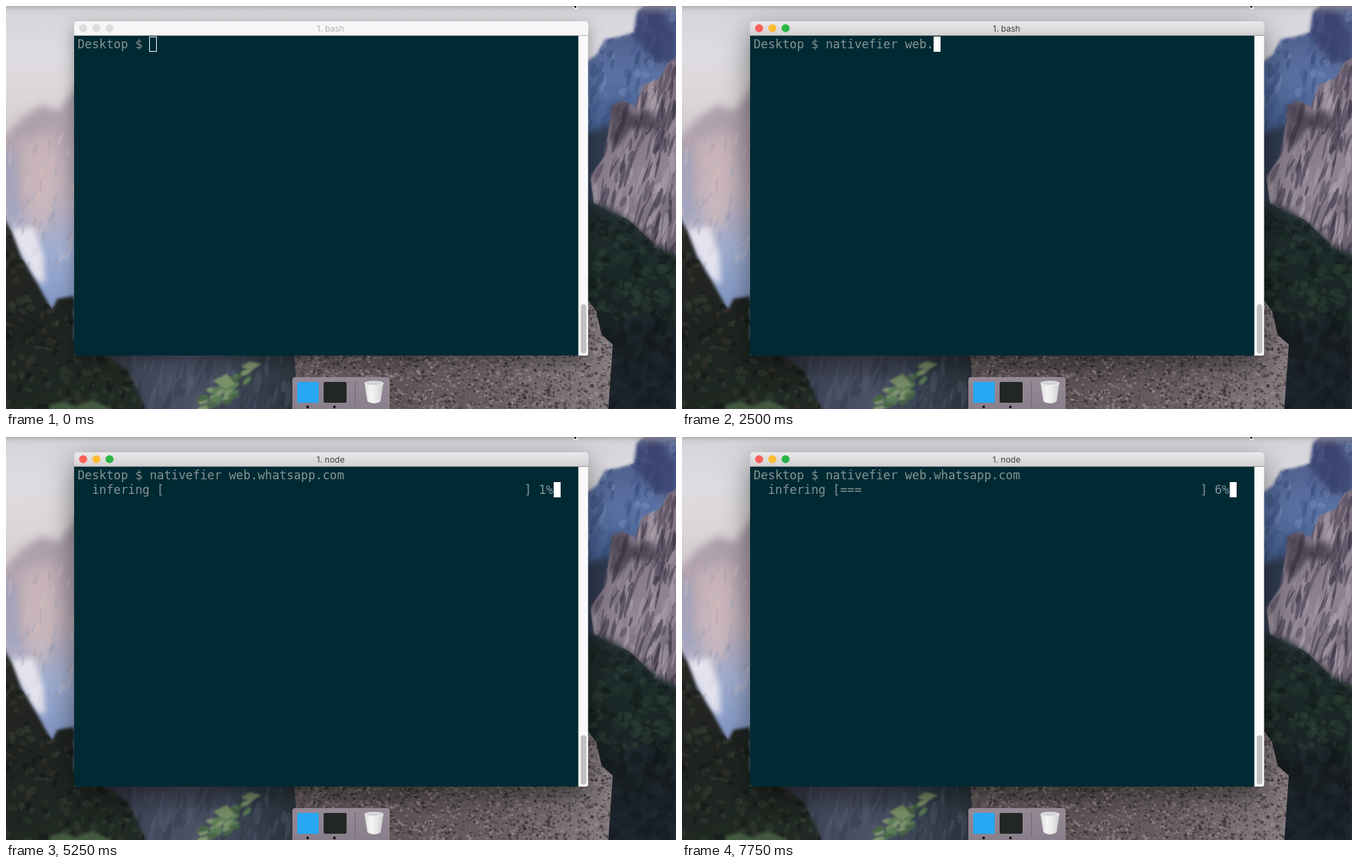
An HTML page with a canvas for the animation above (8 s loop, 964 px wide and 581 px high).

```html
<!DOCTYPE html>
<html lang="en">
<head>
<meta charset="utf-8">
<title>Terminal session</title>
<style>
  html, body { margin: 0; width: 100%; height: 100%; overflow: hidden; }
  canvas { display: block; }
</style>
</head>
<body>
<canvas id="stage" width="964" height="581"></canvas>
<script>
const W = 964, H = 581, LOOP = 8000, STEP = 250;
const COL = 10.375, LINE = 21, LEFT = 103, BASE = 61;
const COMMAND = 'nativefier web.whatsapp.com';
const stage = document.getElementById('stage').getContext('2d');

let seed = 7;
const random = () => (seed = (seed * 16807) % 2147483647) / 2147483647;

function gradient(c, x0, y0, x1, y1, ...colors) {
  const g = c.createLinearGradient(x0, y0, x1, y1);
  colors.forEach((color, i) => g.addColorStop(i / (colors.length - 1), color));
  return g;
}

function box(c, x, y, w, h, radius, fill) {
  c.beginPath();
  c.roundRect(x, y, w, h, radius);
  c.fillStyle = fill;
  c.fill();
}

function oval(c, x, y, rx, ry, fill, turn = 0) {
  c.beginPath();
  c.ellipse(x, y, rx, ry, turn, 0, 2 * Math.PI);
  c.fillStyle = fill;
  c.fill();
}

function shape(c, path, fill, blur = 0) {
  c.filter = blur ? `blur(${blur}px)` : 'none';
  c.fillStyle = fill;
  c.fill(new Path2D(path));
  c.filter = 'none';
}

// Scatters flecks of mean radii w and h over an area, clipped to a path.
function flecks(c, path, [x, y, width, height], count, w, h, alpha, colors) {
  c.save();
  c.clip(new Path2D(path));
  c.globalAlpha = alpha;
  for (let i = 0; i < count; i++) {
    oval(c, x + random() * width, y + random() * height,
      w * (0.4 + random()), h * (0.4 + random()), colors[i % colors.length], random() * 0.5);
  }
  c.restore();
}

function drawLandscape(c) {
  c.fillStyle = gradient(c, 0, 0, 0, 200, '#d5d4d9', '#dedce2', '#dcd6d7', '#cfc5cb');
  c.fillRect(0, 0, W, H);

  // Hazy mountains on the left
  const haze = 'M-9 195L25 160L52 143L76 152L110 105V600H-9Z';
  shape(c, haze, gradient(c, 0, 110, 0, 440, '#a59ca6', '#b3a4b0', '#bcaeba', '#9dadd2', '#7f94c2'), 6);
  shape(c, 'M-9 215L12 205L18 300L-9 310Z', 'rgba(150,158,192,.6)', 6);
  shape(c, 'M22 195L70 180L80 250L60 320L35 330Z', 'rgba(216,192,190,.55)', 8);
  shape(c, 'M5 322L40 318L54 360L56 402L40 392L18 352Z', 'rgba(235,232,240,.9)', 4);
  flecks(c, haze, [0, 170, 98, 210], 60, 2, 9, 0.3, ['#a0919f', '#d6c8c8', '#939fbc']);

  // Distant valley along the bottom
  shape(c, 'M90 495H430V600H90Z', gradient(c, 110, 0, 415, 0, '#262f32', '#3f4557', '#4b5165', '#3b4454', '#2b353d'));
  flecks(c, 'M170 504H415V581H170Z', [170, 504, 245, 77], 70, 4, 15, 0.3, ['#2a323c', '#5d6379']);

  // Dark slope
  const slope = 'M-5 302L8 325L22 362L45 400L66 438L74 422L98 418V490L140 503L175 525L205 590H-5Z';
  shape(c, slope, gradient(c, 0, 310, 90, 581, '#292824', '#1f2320', '#202923'), 2);
  flecks(c, slope, [0, 310, 205, 271], 300, 5, 5, 0.45, ['#111615', '#344035', '#3c372f']);

  // Leaves in front of the valley
  c.save();
  c.filter = 'blur(1.5px)';
  for (let i = 0; i < 34; i++) {
    const along = random(), x = 280 + along * 70, y = 576 - along * 38;
    oval(c, x + random() * 14 - 7, y + random() * 26 - 13, 8, 3.5,
      ['#5b7d56', '#80986f', '#476447'][i % 3], -random());
  }
  c.restore();
  shape(c, 'M338 520L350 512L368 516L352 526ZM298 540L318 530L330 546L312 551Z', '#7b9169', 1.5);
  shape(c, 'M62 576L82 570L100 577L124 568L151 580V590H65Z', '#435a40', 2);

  // Blue peaks on the right
  const peaks = 'M830 84L850 70L862 48L884 44L904 38L908 8L925 -5H970V320H830Z';
  shape(c, peaks, gradient(c, 0, 0, 0, 300, '#4b5480', '#5a72a4', '#3f5a8a', '#2f3d55'), 2);
  flecks(c, peaks, [835, 0, 129, 190], 110, 5, 9, 0.4, ['#304a76', '#7c90b8', '#40598c']);
  shape(c, 'M905 45L912 5L938 -3L950 25L964 40V85L936 85Z', 'rgba(50,56,95,.6)', 4);
  shape(c, 'M830 185L870 170V320H830Z', '#303b50', 5);

  // Cliff and trees
  const cliff = 'M866 188L872 143L888 137L905 145L916 114L941 104L952 82L970 72V375L925 346L888 310L846 284L841 246L860 218Z';
  shape(c, cliff, gradient(c, 850, 150, 960, 350, '#7c7081', '#8f8393', '#6a6070'), 1);
  flecks(c, cliff, [840, 85, 124, 280], 230, 3, 18, 0.5, ['#352f40', '#b4a7b1', '#4c4455', '#a094a0']);
  shape(c, 'M866 188L872 143L888 137L900 158L930 150L945 180L900 176L878 205Z', 'rgba(46,40,54,.6)', 4);
  const trees = 'M830 282L865 290L900 312L935 345L970 362V590H830Z';
  shape(c, trees, gradient(c, 0, 290, 0, 581, '#222d31', '#1a2826', '#181f22', '#1b222c'), 4);
  flecks(c, trees, [830, 300, 134, 150], 170, 7, 6, 0.45, ['#111b1a', '#2f4336', '#22342f']);
  flecks(c, trees, [860, 440, 104, 141], 80, 8, 9, 0.35, ['#10161b', '#232d34']);

  // Granite block
  const rock = 'M415 504L838 425L849 440L857 474L873 488L866 590H421Z';
  shape(c, rock, gradient(c, 420, 0, 873, 0, '#665b5d', '#5f5558', '#6b6165', '#857c81'));
  flecks(c, rock, [415, 425, 460, 156], 4200, 2.2, 1.7, 0.6, ['#2b2729', '#a09290', '#4a4144', '#887b7b', '#655a5c']);

  // Top edge and pointer tail
  c.fillStyle = gradient(c, 0, 0, 0, 14, 'rgba(150,147,145,.6)', 'rgba(200,197,196,.2)', 'rgba(200,197,196,0)');
  c.fillRect(0, 0, W, 14);
  shape(c, 'M814 -2H820L823 3L819 5Z', '#fff');
  shape(c, 'M815 -2H819L821 2L819 3Z', '#111');
}

function drawDock(c) {
  box(c, 412, 535, 140, 52, 4, gradient(c, 0, 535, 0, 581, '#958994', '#897f8c'));
  box(c, 419, 542, 31, 30, 1, '#27a7f3');
  box(c, 457, 542, 33, 30, 2, '#222725');
  oval(c, 434, 578, 2, 2, '#111');
  oval(c, 472.5, 578, 2, 2, '#111');
  c.fillStyle = '#706875';
  c.fillRect(502, 541, 1, 36);
  shape(c, 'M516 544L520 570Q530 576 539 570L543 544Z',
    gradient(c, 516, 0, 543, 0, '#dcdcdd', '#f4f4f4', '#e6e6e7', '#c9c9cc'));
  oval(c, 529.5, 544, 13.5, 3, '#d2d1d3');
  c.strokeStyle = '#f6f6f6';
  c.lineWidth = 1;
  c.stroke();
}

const backdrop = document.createElement('canvas');
backdrop.width = W;
backdrop.height = H;
drawLandscape(backdrop.getContext('2d'));

function drawWindow(active, title) {
  const c = stage;
  c.save();
  c.shadowColor = `rgba(0,0,0,${active ? 0.5 : 0.35})`;
  c.shadowBlur = active ? 42 : 22;
  c.shadowOffsetY = active ? 14 : 8;
  box(c, 98, 22, 739.5, 482, [5, 5, 3, 3], '#fafafa');
  c.restore();

  box(c, 98, 22, 739.5, 21, [5, 5, 0, 0],
    active ? gradient(c, 0, 22, 0, 43, '#ebe9eb', '#d1cfd1') : '#f6f6f6');
  c.fillStyle = active ? '#969696' : '#b4b4b4';
  c.fillRect(98, 42, 739.5, 1);
  ['#fc605b', '#fdbb2f', '#2bb546'].forEach((color, i) =>
    oval(c, 111 + 19 * i, 32, 5.8, 5.8, active ? color : '#dcdcdc'));

  c.font = '12px Inter, sans-serif';
  c.textAlign = 'center';
  c.fillStyle = active ? '#414041' : '#b3b3b3';
  c.fillText(title, 467, 36.5);
  c.textAlign = 'left';

  box(c, 98, 43, 725.5, 461, [0, 0, 0, 3], '#002a33');
  box(c, 827, 430, 8, 71, 4, '#c1c1c1');
}

function drawLine(text, row) {
  stage.font = '17.23px "DejaVu Sans Mono", monospace';
  stage.fillStyle = '#839496';
  stage.fillText(text, LEFT, BASE + row * LINE);
}

function drawCursor(column, row, active) {
  const x = Math.round(LEFT + column * COL), y = 44 + row * LINE;
  if (active) {
    stage.fillStyle = '#fff';
    stage.fillRect(x, y, 10, 22);
  } else {
    stage.strokeStyle = '#fff';
    stage.lineWidth = 1;
    stage.strokeRect(x - 0.5, y + 0.5, 10, 21);
  }
}

function progressLine(percent) {
  const bar = '='.repeat(Math.round(percent / 2)).padEnd(50);
  return `  infering [${bar}] ${Math.round(percent)}%`;
}

function draw(time) {
  const t = Math.floor(time / STEP) * STEP;
  const active = t >= 500, running = t >= 5000;
  // Typing advances seven characters per second.
  const typed = active ? Math.min(COMMAND.length, Math.round(1.01 + (t - 500) * 0.007)) : 0;
  const prompt = 'Desktop $ ' + COMMAND.slice(0, typed);

  stage.drawImage(backdrop, 0, 0);
  drawWindow(active, running ? '1. node' : '1. bash');
  drawDock(stage);
  drawLine(prompt, 0);

  if (running) {
    const progress = progressLine((t - 5000) / 500);
    drawLine(progress, 1);
    drawCursor(progress.length, 1, true);
  } else if (t >= 4500) {
    drawCursor(0, 1, true);
  } else {
    drawCursor(prompt.length, 0, active);
  }
}

const start = performance.now();
function tick() {
  draw((performance.now() - start) % LOOP);
  requestAnimationFrame(tick);
}
tick();
</script>
</body>
</html>
```
